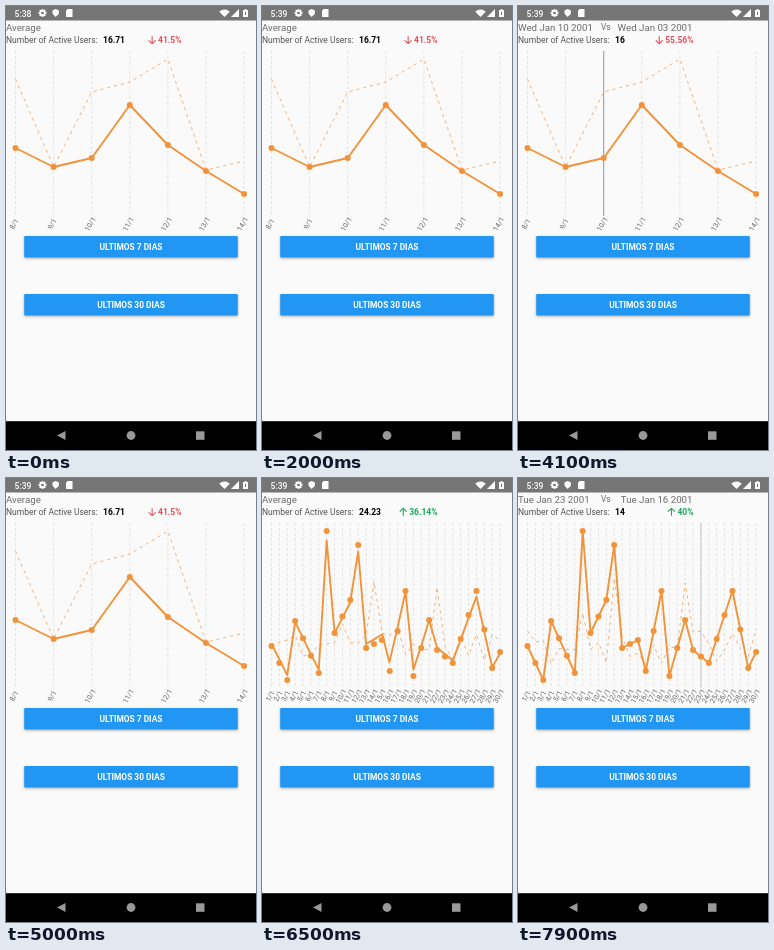
Animation of 250x444 px, one loop 8000 ms. Source, as an HTML page with a canvas:

```html
<!DOCTYPE html>
<html lang="en">
<head>
<meta charset="utf-8">
<title>Active users</title>
<style>
  html, body { margin: 0; width: 100%; height: 100%; overflow: hidden; background: #fafafa; }
  canvas { display: block; }
</style>
</head>
<body>
<canvas id="stage" width="250" height="444"></canvas>
<script>
const ctx = document.getElementById('stage').getContext('2d');
const LOOP = 8000, DAYS = 30, LEFT = 9.5, WIDTH = 228.6, TOP = 45, BOTTOM = 210;
const ORANGE = '#f29339', BLUE = '#2196f3', RED = '#e9505a', GREEN = '#1ba65c';

const mix = (a, b, p) => a + (b - a) * p;
const ramp = (t, from, to) => Math.min(1, Math.max(0, (t - from) / (to - from)));
const ease = p => p < .5 ? 4 * p ** 3 : 1 - (2 - 2 * p) ** 3 / 2;
const place = ys => ys.map((y, i) => [LEFT + WIDTH * i / (ys.length - 1), y]);
const blend = (a, b, p) => a.map(([x, y], i) => [mix(x, b[i][0], p), mix(y, b[i][1], p)]);
const eachDay = rule => Array.from({ length: DAYS }, (_, i) => rule(i));

// Straight runs between turning points given as [day, y].
function through(keys) {
  return eachDay(i => {
    const k = Math.max(1, keys.findIndex(([day]) => day >= i));
    const [[d0, y0], [d1, y1]] = [keys[k - 1], keys[k]];
    return mix(y0, y1, (i - d0) / (d1 - d0));
  });
}

// Seeded low activity with a few busy days.
function noisy(seed, peaks) {
  return eachDay(i => {
    const n = Math.sin((i + 1) * 12.9898 + seed * 78.233) * 43758.5453;
    return peaks[i] ?? 150 + 38 * (n - Math.floor(n));
  });
}

// Spread a short line over the month while keeping its corners.
function subdivide(ys) {
  const last = ys.length - 1, step = last / (DAYS - 1);
  return eachDay(i => {
    let u = i * step;
    if (Math.abs(u - Math.round(u)) <= step / 2 + .001) u = Math.round(u);
    const k = Math.min(Math.floor(u), last - 1);
    return [LEFT + WIDTH * u / last, mix(ys[k], ys[k + 1], u - k)];
  });
}

const week = [142, 161, 152, 99, 139, 165, 188];
const weekBefore = [73, 161, 86, 76, 53, 164, 155];
const month = through([[0, 168], [2, 202], [3, 143], [6, 195], [7, 53], [8, 155], [10, 122],
  [11, 67], [12, 170], [14, 162], [15, 193], [17, 113], [18, 198], [20, 142], [21, 172],
  [23, 185], [26, 113], [28, 190], [29, 174]]);
const monthBefore = noisy(1, { 13: 106, 21: 111 });
const monthShifted = noisy(2, { 7: 135, 11: 100, 20: 105 });

function text(str, x, y, size, color, weight = 400, align = 'left') {
  ctx.font = `${weight} ${size}px Roboto, sans-serif`;
  ctx.textAlign = align;
  ctx.fillStyle = color;
  ctx.fillText(str, x, y);
}

function rect(x, y, w, h, color) {
  ctx.fillStyle = color;
  ctx.fillRect(x, y, w, h);
}

function shape(points, color) {
  ctx.fillStyle = color;
  ctx.beginPath();
  points.forEach(p => ctx.lineTo(...p));
  ctx.fill();
}

function line(points, color, width, dash = []) {
  ctx.strokeStyle = color;
  ctx.lineWidth = width;
  ctx.setLineDash(dash);
  ctx.beginPath();
  points.forEach(p => ctx.lineTo(...p));
  ctx.stroke();
  ctx.setLineDash([]);
}

function disc(x, y, r, color) {
  ctx.fillStyle = color;
  ctx.beginPath();
  ctx.arc(x, y, r, 0, 7);
  ctx.fill();
}

function statusBar(t) {
  const bar = '#757575', white = '#fff';
  rect(0, 0, 250, 14.5, bar);
  text(t < 1700 ? '5:38' : '5:39', 8.5, 10.5, 8.6, white, 500);
  for (let i = 0; i < 4; i++) {
    const a = i * Math.PI / 4, c = Math.cos(a) * 4, s = Math.sin(a) * 4;
    line([[36.5 - c, 7 - s], [36.5 + c, 7 + s]], white, 1.6);
  }
  disc(36.5, 7, 3, white);
  disc(36.5, 7, 1.3, bar);
  shape([[49.7, 3], [53, 4.4], [52.7, 8], [49.7, 11], [46.7, 8], [46.4, 4.4]], white);
  shape([[61.5, 3], [66.5, 3], [66.5, 11], [60, 11], [60, 4.8]], white);
  ctx.beginPath();
  ctx.moveTo(218.5, 11);
  ctx.arc(218.5, 11, 7.5, -2.35, -.79);
  ctx.fill();
  shape([[225, 11], [233, 11], [233, 3]], white);
  rect(237, 4, 5, 7, white);
  rect(238.5, 3, 2, 1, white);
  rect(239, 6, 1, 3, bar);
}

function arrow(x, up, color) {
  const d = up ? -1 : 1, y = 34;
  line([[x, y - 3.7 * d], [x, y + 3.5 * d]], color, 1.1);
  line([[x - 3.5, y + .3 * d], [x, y + 3.7 * d], [x + 3.5, y + .3 * d]], color, 1.1);
}

function header({ date, versus, users, change, up }) {
  const gray = '#6b6b6b', color = up ? GREEN : RED;
  text(date, 0, 25, 9.7, gray);
  if (versus) {
    text('Vs', 83, 23.5, 8.3, gray);
    text(versus, 174.5, 25, 9.7, gray, 400, 'right');
  }
  text('Number of Active Users:', 0, 37, 8.5, '#555');
  text(users, 97, 37, 8.5, '#000', 700);
  text(change, 175.5, 37, 8.5, color, 700, 'right');
  arrow(175.5 - ctx.measureText(change).width - 6, up, color);
}

function axis(count, firstDay) {
  for (let i = 0; i < count; i++) {
    const x = LEFT + WIDTH * i / (count - 1);
    line([[x, TOP], [x, BOTTOM]], '#e4e4e4', 1, [3, 2]);
    ctx.save();
    ctx.translate(x - 1.4, 218);
    ctx.rotate(-Math.PI / 3);
    text(`${firstDay + i}/1`, 0, 2.5, 7.2, '#666', 400, 'center');
    ctx.restore();
  }
}

function cursor(x, alpha) {
  ctx.globalAlpha = alpha;
  line([[x, TOP], [x, BOTTOM]], '#999', 1);
  ctx.globalAlpha = 1;
}

function button(label, y, ripple = 0, fade = 0) {
  ctx.save();
  ctx.shadowColor = 'rgba(0,0,0,.3)';
  ctx.shadowBlur = 3;
  ctx.shadowOffsetY = 1.2;
  ctx.fillStyle = BLUE;
  ctx.beginPath();
  ctx.roundRect(18.2, y, 213.6, 21.3, 1.2);
  ctx.fill();
  ctx.shadowColor = 'transparent';
  ctx.clip();
  if (ripple) disc(125, y + 11, ripple, `rgba(0,0,0,${.13 * fade})`);
  ctx.restore();
  text(label, 125, y + 13.8, 8.4, '#fff', 700, 'center');
}

function navBar() {
  const gray = '#999';
  rect(0, 415.2, 250, 29, '#000');
  shape([[51, 429.5], [59.5, 425], [59.5, 434]], gray);
  disc(125, 429.5, 4.4, gray);
  rect(190, 425.3, 8.5, 8.5, gray);
}

function stats(t) {
  if (t >= 7500) return { date: 'Tue Jan 23 2001', versus: 'Tue Jan 16 2001', users: '14', change: '40%', up: true };
  if (t >= 6050) return { date: 'Average', users: '24.23', change: '36.14%', up: true };
  if (t >= 2600 && t < 4200) return { date: 'Wed Jan 10 2001', versus: 'Wed Jan 03 2001', users: '16', change: '55.56%' };
  return { date: 'Average', users: '16.71', change: '41.5%' };
}

function draw(t) {
  const monthly = t >= 6050;
  const dots = place(monthly ? month : week);
  let solid = dots, dashed = place(weekBefore);
  if (monthly) {
    const morph = ease(ramp(t, 6050, 6680));
    solid = blend(subdivide(week), dots, morph);
    dashed = blend(subdivide(weekBefore), place(monthBefore), morph);
    dashed = blend(dashed, place(monthShifted), ease(ramp(t, 7400, 7850)));
  }

  rect(0, 0, 250, 444, '#fafafa');
  statusBar(t);
  header(stats(t));
  axis(dots.length, monthly ? 1 : 8);
  cursor(LEFT + WIDTH / 3, ramp(t, 2600, 3000) * (1 - ramp(t, 4100, 4500)));
  cursor(LEFT + WIDTH * 22 / 29, ramp(t, 7700, 8100));
  line(dashed, '#f5b27a', 1, [3.2, 3.8]);
  ctx.lineJoin = 'round';
  line(solid, ORANGE, 1.9);
  dots.forEach(([x, y]) => disc(x, y, 3, ORANGE));
  button('ULTIMOS 7 DIAS', 230.1);
  button('ULTIMOS 30 DIAS', 288.1, 125 * ramp(t, 5995, 6200), 1 - ramp(t, 6200, 6500));
  navBar();
}

function frame(now) {
  draw(now % LOOP);
  requestAnimationFrame(frame);
}
requestAnimationFrame(frame);
</script>
</body>
</html>
```
